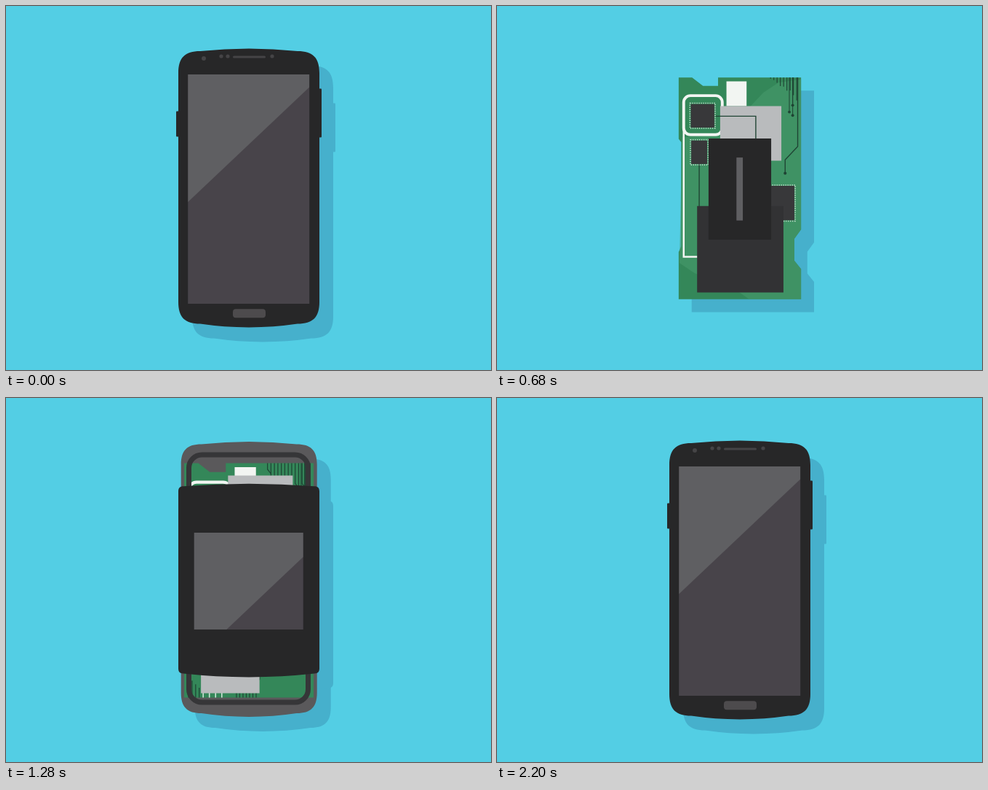
Write an HTML page with a canvas that moves like this. It is 667 by 500 pixels and loops after 2280 ms.

```html
<!DOCTYPE html>
<html lang="en">
<head>
<meta charset="utf-8">
<title>Phone assembly</title>
<style>
html, body { margin: 0; width: 100%; height: 100%; overflow: hidden; background: #53cee4; }
canvas { display: block; width: 667px; height: 500px; }
</style>
</head>
<body>
<canvas id="stage" width="667" height="500"></canvas>
<script>
const g = document.getElementById('stage').getContext('2d');
const LOOP = 2280, STEP = 40, CX = 334;
const BG = '#53cee4', SHADOW = '#46b0cc', BLACK = '#272728', CHIP = '#38383a';
const GREEN = '#348759', LIGHT = '#469a6c', TRACE = '#1f4434', WHITE = '#f2f5f2', GREY = '#b9bbbd';

const ramp = (t, a, b) => Math.max(0, Math.min(1, (t - a) / (b - a)));
const ease = (t, a, b) => 1 - (1 - ramp(t, a, b)) ** 2;
const bump = (t, a, b) => Math.sin(Math.PI * ramp(t, a, b));
const mix = (a, b, p) => a + (b - a) * p;
const mixBox = (a, b, p) => a.map((v, i) => mix(v, b[i], p));

function box(l, t, r, b, color, radius = 0) {
  if (r <= l || b <= t) return;
  g.fillStyle = color;
  g.beginPath();
  g.roundRect(l, t, r - l, b - t, radius);
  g.fill();
}

// Box around a centre point.
const block = (x, y, w, h, color, radius) =>
  box(x - w / 2, y - h / 2, x + w / 2, y + h / 2, color, radius);

function dot(x, y, r, color) {
  g.fillStyle = color;
  g.beginPath();
  g.arc(x, y, r, 0, Math.PI * 2);
  g.fill();
}

function poly(pts, color) {
  g.fillStyle = color;
  g.beginPath();
  for (let i = 0; i < pts.length; i += 2) g.lineTo(pts[i], pts[i + 1]);
  g.closePath();
  g.fill();
}

// Polyline drawn up to the share p of its length.
function line(pts, p, color = TRACE, width = 1.2) {
  if (p <= 0) return;
  let len = 0;
  g.beginPath();
  g.moveTo(pts[0], pts[1]);
  for (let i = 2; i < pts.length; i += 2) {
    len += Math.hypot(pts[i] - pts[i - 2], pts[i + 1] - pts[i - 1]);
    g.lineTo(pts[i], pts[i + 1]);
  }
  g.strokeStyle = color;
  g.lineWidth = width;
  g.setLineDash(p < 1 ? [len * p, len] : []);
  g.stroke();
  g.setLineDash([]);
}

// Slab with rounded corners and bowed ends, centred on x and y.
function slab({ x, y, w, h, rad, bow }, color) {
  const l = x - w / 2, r = x + w / 2, t = y - h / 2, b = y + h / 2;
  const a = t + bow, z = b - bow * 1.4, k = rad * 0.3;
  g.fillStyle = color;
  g.beginPath();
  g.moveTo(l, a + rad);
  g.bezierCurveTo(l, a + k, l + k, a, l + rad, a);
  g.quadraticCurveTo(x, t - bow, r - rad, a);
  g.bezierCurveTo(r - k, a, r, a + k, r, a + rad);
  g.lineTo(r, z - rad);
  g.bezierCurveTo(r, z - k, r - k, z, r - rad, z);
  g.quadraticCurveTo(x, b + bow * 1.4, l + rad, z);
  g.bezierCurveTo(l + k, z, l, z - k, l, z - rad);
  g.closePath();
  g.fill();
}

const OUTLINE = [261, 119, 277, 119, 290, 129, 308, 129, 308, 119, 407, 119, 407, 300,
  399, 311, 399, 337, 407, 347, 407, 383, 261, 383, 261, 327, 264, 320, 264, 196, 261, 192];

// The board pops in, then keeps growing ever more slowly.
function onBoard(t, draw) {
  const growth = Math.min(1.22, 1.272 - 0.272 * 0.438 ** ((t - 360) / 320));
  const s = growth * ease(t, 0, 160);
  g.save();
  g.translate(CX, 250.5);
  g.scale(s, s);
  g.translate(-CX, -251);
  draw();
  g.restore();
}

function boardBase(t) {
  poly(OUTLINE, GREEN);
  g.globalAlpha = 1 - ramp(t, 480, 960);
  poly([265, 190, 314, 188, 362, 137, 380, 125, 407, 121, 407, 300, 399, 311, 399, 337,
    407, 347, 407, 383, 345, 383, 331, 373, 280, 352, 262, 340], LIGHT);
  g.globalAlpha = 1;
}

function bundles(t) {
  const top = ramp(t, 560, 960), low = ramp(t, 740, 980);
  for (let i = 0; i < 13; i++) {
    const x = 355 + i * 3.9, y = 126 + (i * 7 % 5) * 3 + i * 1.6;
    const p = ramp(top, (12 - i) * 0.035, 0.6 + (12 - i) * 0.03);
    line([x, 119, x, y, x + 4, y + 5, x + 4, y + 15], p, TRACE, 1);
    if (p === 1 && i > 5) dot(x + 4, y + 16, 1.4, TRACE);
  }
  for (let i = 0; i < 4; i++) line([282.5 + i * 7, 383, 282.5 + i * 7, 334], low, '#cfe6d8', 1.3);
  for (let i = 0; i < 7; i++) {
    const x = 320 + i * 3.7, y = 350 + (i * 3 % 5) * 4;
    line([x, 383, x, y + 5, x + 4, y, x + 4, 335], low, TRACE, 1);
    if (i < 4) line([266 + i * 4, 383, 266 + i * 4, 360 + i * 4], low, TRACE, 1);
  }
  for (const [x, y] of [[393, 160], [397, 152], [397, 164]]) {
    line([x, 119, x, y], ramp(t, 200, 340), TRACE, 0.9);
    if (t > 320) dot(x, y, 1.7, TRACE);
  }
  line([403, 119, 403, 201, 388, 217, 388, 233], ramp(t, 180, 350));
  if (t > 320) dot(388, 233, 1.8, TRACE);
}

function prints(t) {
  const p = ramp(t, 120, 330);
  line([267, 176, 267, 332.5, 352, 332.5, 352, 208], p, WHITE, 2.2);
  line([319, 216, 349, 216, 349, 269, 319, 269, 319, 215], p, WHITE, 2);
  if (p > 0) {
    g.strokeStyle = WHITE;
    g.lineWidth = 3.4;
    g.setLineDash([180 * p, 500]);
    g.beginPath();
    g.moveTo(313, 178);
    g.arcTo(313, 187, 304, 187, 8);
    g.arcTo(267, 187, 267, 178, 8);
    g.arcTo(267, 140.5, 277, 140.5, 8);
    g.arcTo(313, 140.5, 313, 151, 8);
    g.lineTo(313, 165);
    g.stroke();
    g.setLineDash([]);
  }
  dot(311, 199, 5 * ease(t, 220, 340), WHITE);
  dot(339, 295, 10 * ease(t, 240, 360), WHITE);
}

// Small plates that spread across the board.
function plates(t) {
  if (t < 240) return;
  const p = ramp(t, 360, 680), q = ramp(t, 360, 1000), rise = 20 * ramp(t, 700, 1000);
  box(...mixBox([327, 132, 334, 151], [318, 123.5, 342, 153], p), WHITE);
  const [l, top, r, b] = mixBox([341, 163, 351, 210], [310.5, 153, 383.5, 218], p);
  box(l, top - rise, r, b - rise, GREY);
  box(...mixBox([365, 297, 373, 352], [347, 300, 390, 341], q), GREY);
  if (t > 720) box(280, 310, 346, mix(335, 378, ramp(t, 1000, 1240)), GREY);
}

function chips(t) {
  const p = ramp(t, 200, 350), small = ease(t, 220, 350) * (1 - ramp(t, 560, 700));
  line([305, 165, 353, 165, 353, 235, 338, 235], p);
  line([296, 207, 313, 207, 313, 199, 334, 199, 334, 230], p);
  line([285.5, 222, 285.5, 312, 302, 312], p);
  const main = [[289.5, 164.5, 28, 28], [285.5, 208, 19, 28], [378.5, 268.5, 41, 41]];
  main.forEach(([x, y, w, h], i) => {
    const s = ease(t, 120 + i * 40, 260 + i * 40);
    if (s === 1) {
      g.strokeStyle = '#c4dfce';
      g.lineWidth = 1.3;
      g.setLineDash([1.2, 1.4]);
      g.strokeRect(x - w / 2 - 1, y - h / 2 - 1, w + 2, h + 2);
      g.setLineDash([]);
    }
    block(x, y, w * s, h * s, CHIP, 0.8);
  });
  for (const [x, y, size] of [[358, 298, 16], [326, 297.5, 14], [326, 330, 12],
    [358.5, 345.5, 13], [307, 250, 7], [326, 314, 6], [342, 330, 6]])
    block(x, y, size * small, size * small, size > 8 ? CHIP : '#25382f', 0.8);
}

function panel(t) {
  const mid = mixBox([302, 290, 317, 322], [283, 272, 386, 375], ramp(t, 360, 680));
  if (t >= 240) box(...mixBox(mid, [275, 148, 387, 316], ramp(t, 680, 1000)), '#323234');
}

function shellShape(t) {
  const p = ramp(t, 1000, 1120);
  return { x: CX + 0.2, y: 249, w: 187, h: 378 * ramp(t, 840, 1120) ** 0.75, rad: 28 * p, bow: 3.5 * p };
}

// Widens first, then stretches to full length and settles.
function frontShape(t) {
  return {
    x: CX,
    y: mix(242, 251.5, ramp(t, 340, 640)) - 1.5 * ramp(t, 1000, 1440),
    w: 194 * ramp(t, 330, 1000) ** 1.25,
    h: 176 * ease(t, 300, 1000) + 207 * ramp(t, 1000, 1440) ** 1.85 + 7 * bump(t, 1360, 1640),
    rad: 30 * ramp(t, 1230, 1440),
    bow: 3.5 * ramp(t, 900, 1200)
  };
}

function buttons(t, color) {
  const p = ramp(t, 1360, 1440), slide = ease(t, 1440, 1720);
  block(431, 147 - 3 * bump(t, 1380, 1560), 6, 67 * p, color, 1);
  block(237, mix(316, 162, slide), 6, (11 + 24 * slide) * p, color, 1);
}

function screen(t) {
  if (t < 480) return;
  const w = 8 + 159 * ramp(t, 640, 1320) ** 1.85;
  const h = 133 * ease(t, 460, 1000) + 182 * ramp(t, 1280, 1440) + 4 * bump(t, 1360, 1640);
  const l = CX - 0.3 - w / 2, r = l + w, y = 251.4 - h / 2;
  const c = 303 - 14 * ramp(t, 1000, 1280) - 77 * ramp(t, 1280, 1440) - 22 * ease(t, 1440, 1840);
  const edge = x => c - (x - CX) * 0.945;
  box(l, y, r, y + h, '#48444a');
  g.save();
  g.beginPath();
  g.rect(l, y, w, h);
  g.clip();
  poly([l, 0, r, 0, r, edge(r), l, edge(l)], '#5f5f62');
  g.restore();
}

function trim(t) {
  const home = 45 * ramp(t, 1360, 1440) + 13 * bump(t, 1380, 1560);
  block(CX + 0.5, 422.3, home, 12, '#4d4b4d', 4);
  if (t < 1440) return;
  const color = '#454446', q = ease(t, 1520, 1720);
  block(CX + 0.5, 70, 2 + 43 * ease(t, 1440, 1640), 3, color, 1.5);
  dot(272, 72, 3 * q, color);
  for (const x of [296, 305, 366]) dot(x, 69, 2.6 * q, color);
}

function shadows(t) {
  onBoard(t, () => { g.translate(15.5, 15.5); poly(OUTLINE, SHADOW); });
  g.save();
  g.translate(19, 20);
  slab(shellShape(t), SHADOW);
  slab(frontShape(t), SHADOW);
  buttons(t, SHADOW);
  g.restore();
}

function inside(t) {
  slab(shellShape(t), '#5a595b');
  onBoard(t, () => {
    boardBase(t);
    bundles(t);
    prints(t);
    plates(t);
    chips(t);
    panel(t);
  });
  if (t > 800) {
    line([351, 338, 351, 352], 1, '#29292a', 2);
    dot(357, 365, 6 * ease(t, 800, 920), WHITE);
  }
  if (t > 1040) {
    const { y, h } = shellShape(t);
    g.strokeStyle = '#363638';
    g.lineWidth = 7;
    g.beginPath();
    g.roundRect(251.5, y - h / 2 + 18, 164, h - 38, 18);
    g.stroke();
  }
}

function render(time) {
  const t = time < STEP ? LOOP : time;
  g.fillStyle = BG;
  g.fillRect(0, 0, 667, 500);
  shadows(t);
  if (t < 1440) inside(t);
  buttons(t, BLACK);
  slab(frontShape(t), BLACK);
  screen(t);
  trim(t);
}

const start = performance.now();
function tick() {
  const t = (performance.now() - start) % LOOP;
  render(Math.floor(t / STEP) * STEP);
  requestAnimationFrame(tick);
}
tick();
</script>
</body>
</html>
```
